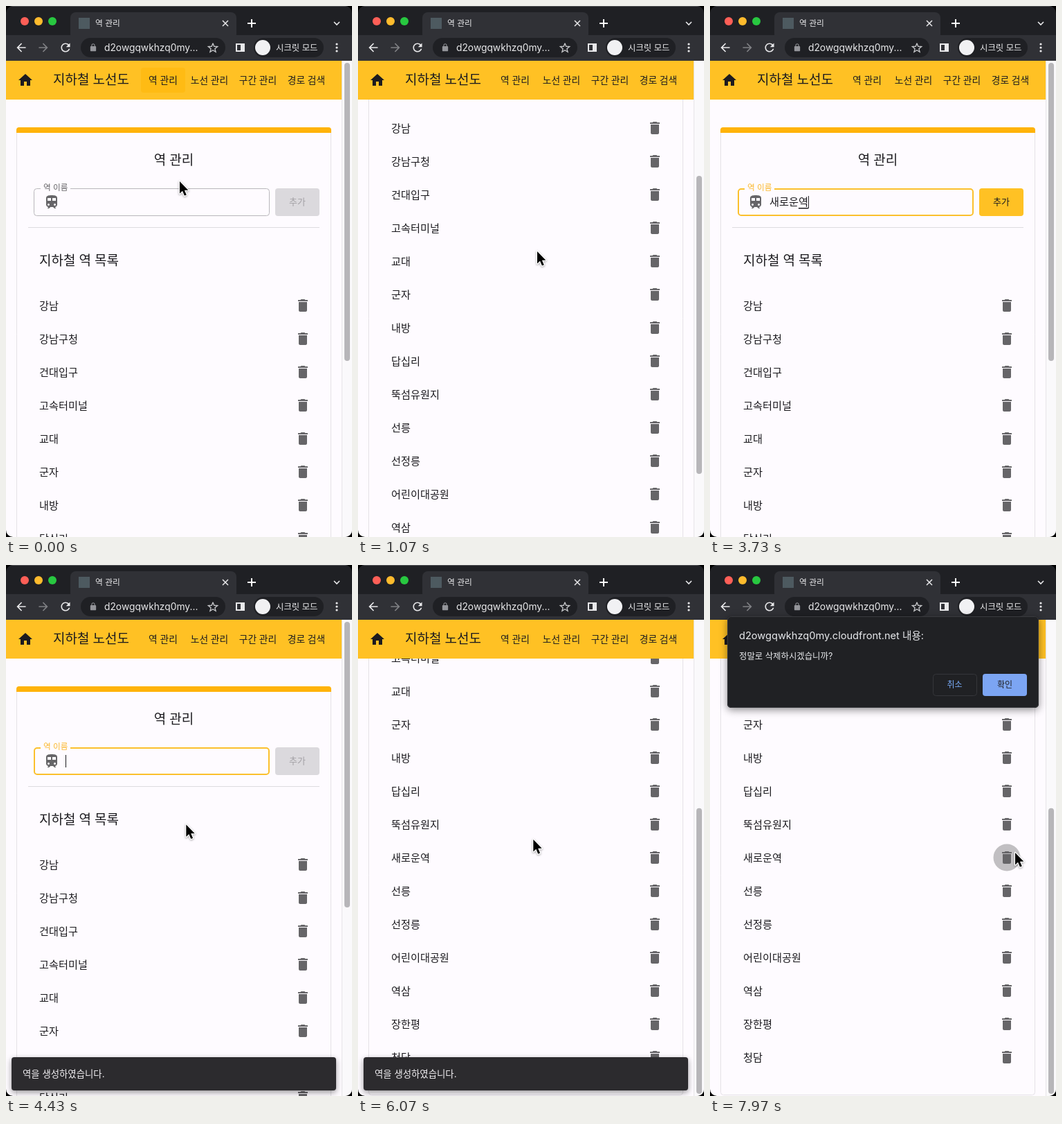
Recreate the animation shown at these times as an HTML page with a canvas. Size 500 px wide and 766 px high, loop 8 s.

```html
<!DOCTYPE html>
<html lang="ko">
<head>
<meta charset="utf-8">
<title>지하철 노선도</title>
<style>
  html, body { margin: 0; width: 100%; height: 100%; overflow: hidden; background: #000; }
  canvas { display: block; width: 500px; height: 766px; }
</style>
</head>
<body>
<canvas id="stage"></canvas>
<script>
const W = 500, H = 766, LOOP = 8000;
const canvas = document.getElementById('stage');
const ctx = canvas.getContext('2d');
const dpr = window.devicePixelRatio || 1;
canvas.width = W * dpr;
canvas.height = H * dpr;

const INK = '#1c1b1f', AMBER = '#ffc124', PAGE = '#fefbff', GRAY = '#666568';
const STATIONS = ['강남', '강남구청', '건대입구', '고속터미널', '교대', '군자', '내방', '답십리', '뚝섬유원지',
  '선릉', '선정릉', '어린이대공원', '역삼', '장한평', '청담'];
const NEW_STATION = '새로운역', NEW_INDEX = 9;
const TYPED = ['ㅅ', '새', '샐', '새로', '새롱', '새로우', '새로운', '새로운ㅇ', '새로운여', NEW_STATION];

// Moments of the interaction, in ms
const FOCUS = 2000, ENABLE = 2200, TYPE = 2340, KEY = 130, SUBMIT = 4080, SNACK_OUT = 7100;
const CLICK = 7700, DIALOG = 7830;

// 24 x 24 icons
const ICONS = {
  trash: 'M6 19c0 1.1.9 2 2 2h8c1.1 0 2-.9 2-2V7H6v12zM19 4h-3.5l-1-1h-5l-1 1H5v2h14V4z',
  home: 'M10 20v-6h4v6h5v-8h3L12 3 2 12h3v8z',
  train: 'M12 2c-4 0-8 .5-8 4v9.5C4 17.43 5.57 19 7.5 19L6 20.5v.5h2.23l2-2H14l2 2h2v-.5L16.5 19c1.93 0 3.5-1.57 3.5-3.5V6c0-3.5-3.58-4-8-4zM7.5 17c-.83 0-1.5-.67-1.5-1.5S6.67 14 7.5 14s1.5.67 1.5 1.5S8.33 17 7.5 17zm3.5-7H6V6h5v4zm2 0V6h5v4h-5zm3.5 7c-.83 0-1.5-.67-1.5-1.5s.67-1.5 1.5-1.5 1.5.67 1.5 1.5-.67 1.5-1.5 1.5z',
  back: 'M20 11H7.83l5.59-5.59L12 4l-8 8 8 8 1.41-1.41L7.83 13H20v-2z',
  reload: 'M17.65 6.35C16.2 4.9 14.21 4 12 4c-4.42 0-7.99 3.58-7.99 8s3.57 8 7.99 8c3.73 0 6.84-2.55 7.73-6h-2.08c-.82 2.33-3.04 4-5.65 4-3.31 0-6-2.69-6-6s2.69-6 6-6c1.66 0 3.14.69 4.22 1.78L13 11h7V4l-2.35 2.35z',
  lock: 'M18 8h-1V6c0-2.76-2.24-5-5-5S7 3.24 7 6v2H6c-1.1 0-2 .9-2 2v10c0 1.1.9 2 2 2h12c1.1 0 2-.9 2-2V10c0-1.1-.9-2-2-2zM9 6c0-1.66 1.34-3 3-3s3 1.34 3 3v2H9V6z'
};
for (const name in ICONS) ICONS[name] = new Path2D(ICONS[name]);
const ARROW = new Path2D('M0 0V17.5L4 13.8 6.9 20.6 9.8 19.4 6.9 12.8H12.4Z');

// Keyframes: [time, value, value, ...]
const SCROLL = [[0, 0], [350, 0], [850, 256], [1120, 256], [1620, 0], [4450, 0], [5150, 135], [5300, 135], [5800, 442]];
const POINTER = [[0, 251, 253], [350, 259, 354], [1620, 259, 354], [1950, 240, 285], [4250, 240, 285], [4500, 265, 395],
  [5900, 265, 395], [6600, 187, 402], [7130, 187, 402], [7500, 434, 428], [7650, 441, 415]];

const clamp = v => Math.max(0, Math.min(1, v));
const mix = (a, b, k) => a + (b - a) * k;
const smooth = k => k * k * (3 - 2 * k);
const ramp = (t, start, length) => smooth(clamp((t - start) / length));
const blend = (a, b, k) => `rgb(${a.map((v, i) => Math.round(mix(v, b[i], k)))})`;

function track(keys, t) {
  let i = 0;
  while (i < keys.length - 1 && keys[i + 1][0] <= t) i++;
  const a = keys[i], b = keys[Math.min(i + 1, keys.length - 1)];
  const k = a === b ? 0 : smooth((t - a[0]) / (b[0] - a[0]));
  return a.slice(1).map((v, n) => mix(v, b[n + 1], k));
}

function box(x, y, w, h, r, fill) {
  ctx.beginPath();
  ctx.roundRect(x, y, w, h, r);
  ctx.fillStyle = fill;
  ctx.fill();
}

function frame(x, y, w, h, r, color, width) {
  ctx.beginPath();
  ctx.roundRect(x + width / 2, y + width / 2, w - width, h - width, r);
  ctx.strokeStyle = color;
  ctx.lineWidth = width;
  ctx.stroke();
}

function disc(x, y, r, fill) {
  ctx.beginPath();
  ctx.arc(x, y, r, 0, Math.PI * 2);
  ctx.fillStyle = fill;
  ctx.fill();
}

function lines(color, width, ...paths) {
  ctx.beginPath();
  for (const p of paths)
    for (let i = 0; i < p.length; i += 2) i ? ctx.lineTo(p[i], p[i + 1]) : ctx.moveTo(p[0], p[1]);
  ctx.strokeStyle = color;
  ctx.lineWidth = width;
  ctx.stroke();
}

// Text is placed by its vertical centre
function text(s, x, y, size, color = INK, weight = 400, align = 'left') {
  ctx.font = `${weight} ${size}px Inter, "Noto Sans CJK KR", "Noto Sans CJK", sans-serif`;
  ctx.textAlign = align;
  ctx.fillStyle = color;
  ctx.fillText(s, x, y + size * 0.37);
}

function icon(name, x, y, color, sx = 1, sy = Math.abs(sx)) {
  ctx.save();
  ctx.translate(x, y);
  ctx.scale(sx, sy);
  ctx.translate(-12, -12);
  ctx.fillStyle = color;
  ctx.fill(ICONS[name]);
  ctx.restore();
}

function shadow(color, blur, dy) {
  ctx.shadowColor = color;
  ctx.shadowBlur = blur * dpr;
  ctx.shadowOffsetY = dy * dpr;
}

function drawBrowser() {
  const dark = '#1f2024', bar = '#303136', light = '#e8e8ea';
  box(0, 0, W, 79, 0, dark);
  box(93, 9, 240, 40, 8, bar);
  box(0, 42, W, 37, 0, bar);
  ['#fe5f57', '#febb2d', '#28c840'].forEach((c, i) => disc(27 + i * 20, 22, 6, c));
  box(105, 17, 16, 16, 0, '#4d5a60');
  text('역 관리', 129, 25, 11.8, light);
  lines(light, 1.5, [313, 21, 321, 29], [321, 21, 313, 29]);
  lines('#fff', 2, [349, 25, 361, 25], [355, 19, 355, 31]);
  lines(light, 1.6, [474, 23, 478, 27, 482, 23]);

  icon('back', 22, 60, light, 0.82);
  icon('back', 54, 60, '#7f8084', -0.82);
  icon('reload', 86, 60, light, 0.82);
  box(108, 46, 209, 28, 14, dark);
  icon('lock', 126, 60, '#94959a', 0.52);
  text('d2owgqwkhzq0my...', 142, 60, 13.8, light);
  const star = [];
  for (let i = 0; i <= 10; i++) {
    const a = -Math.PI / 2 + i * Math.PI / 5, r = i % 2 ? 3 : 7;
    star.push(299 + r * Math.cos(a), 60.7 + r * Math.sin(a));
  }
  lines('#c6c7ca', 1.3, star);
  frame(332, 54, 13, 12, 0, light, 2);
  box(339, 54, 6, 12, 0, light);
  box(358, 46, 101, 28, 14, dark);
  disc(371, 60, 11, '#f1f1f3');
  text('시크릿 모드', 390, 60, 12.4, light);
  [55, 60, 65].forEach(y => disc(478, y, 1.6, light));
}

function drawHeader(t) {
  box(0, 79, 485, 56, 0, AMBER);
  const hover = 1 - ramp(t, 60, 250);
  if (hover > 0) box(195, 89, 64, 36, 4, `rgba(255,179,0,${0.45 * hover})`);
  icon('home', 28, 107, INK);
  text('지하철 노선도', 68, 106, 19, INK, 500);
  text('역 관리', 227, 107, 13.8, INK, 500, 'center');
  ['노선 관리', '구간 관리', '경로 검색'].forEach((s, i) => text(s, 294 + i * 70, 107, 13.8, INK, 500, 'center'));
}

function drawForm(t) {
  const focused = t >= FOCUS;
  const accent = focused ? '#fbc02d' : '#b9b7bb';
  text('역 관리', 242.5, 222, 19, INK, 500, 'center');
  frame(40, 263, 341, 40, 4, accent, focused ? 2 : 1);
  box(50, 261, 43, 5, 0, PAGE);
  text('역 이름', 54, 262, 11.7, focused ? '#fbb82d' : GRAY);
  icon('train', 66, 283, GRAY);

  const enabled = ramp(t, ENABLE, 250) * (1 - ramp(t, SUBMIT, 250));
  box(389, 263, 64, 40, 4, blend([219, 217, 221], [255, 193, 36], enabled));
  text('추가', 421, 282, 13, blend([164, 162, 166], [28, 27, 31], enabled), 500, 'center');

  const typing = t >= TYPE && t < SUBMIT;
  const step = Math.min(TYPED.length - 1, Math.floor((t - TYPE) / KEY));
  const value = typing ? TYPED[step] : '';
  text(value, 86, 282.5, 15.2);
  const end = 86 + (value ? ctx.measureText(value).width : 0);
  if (value) box(end - 14, 291, 14, 1.6, 0, INK);
  const edited = t >= SUBMIT ? SUBMIT : typing ? TYPE + step * KEY : FOCUS;
  if (focused && (t - edited) % 1000 < 500) box(end, 274, 1, 18, 0, INK);
}

function drawPage(t, scroll) {
  const added = t >= SUBMIT;
  const names = STATIONS.slice();
  if (added) names.splice(NEW_INDEX, 0, NEW_STATION);

  box(0, 79, W, H - 79, 0, PAGE);
  ctx.save();
  ctx.beginPath();
  ctx.rect(0, 135, 485, H - 135);
  ctx.clip();
  ctx.translate(0, -scroll);
  frame(15, 175, 455, 312 + names.length * 48 + 720 - 720 - 48 + 0, 4, '#e4e1e6', 1);
  box(15, 175, 455, 8, [4, 4, 0, 0], '#ffb30a');
  drawForm(t);
  box(32, 319, 421, 1, 0, '#dddbdf');
  text('지하철 역 목록', 48, 367, 19, INK, 500);
  names.forEach((name, i) => {
    const y = 432 + i * 48;
    if (added && i === NEW_INDEX) {
      const hover = ramp(t, 7480, 150), ripple = ramp(t, CLICK, 200);
      if (hover) disc(429, y, 19.5, `rgba(0,0,0,${0.05 * hover})`);
      if (ripple) disc(429, y, 19.5 * mix(0.3, 1, ripple), 'rgba(0,0,0,.2)');
    }
    text(name, 48, y, 15.2);
    icon('trash', 429, y, GRAY);
  });
  ctx.restore();
  drawHeader(t);

  box(485, 79, 15, H - 79, 0, '#faf9fb');
  box(485, 79, 1, H - 79, 0, '#e7e5e8');
  const ratio = added ? 0.608 : 0.637;
  box(489, 82 + scroll * ratio, 8, added ? 412 : 430, 4, '#b7b6b9');
}

function drawSnackbar(t) {
  const shown = ramp(t, SUBMIT, 120) * (1 - ramp(t, SNACK_OUT, 195));
  if (!shown) return;
  ctx.save();
  ctx.globalAlpha = shown;
  ctx.translate(242.5, 734);
  ctx.scale(mix(0.75, 1, shown), mix(0.56, 1, shown));
  ctx.translate(-242.5, -734);
  shadow('rgba(0,0,0,.4)', 8, 3);
  box(8, 710, 469, 48, 4, '#2c2b2e');
  shadow('transparent', 0, 0);
  text('역을 생성하였습니다.', 24, 734, 13.4, '#f4f2f5');
  ctx.restore();
}

function drawDialog() {
  ctx.save();
  shadow('rgba(0,0,0,.45)', 12, 3);
  box(25, 74, 450, 132, 5, '#202124');
  ctx.restore();
  frame(25, 74, 450, 132, 5, '#3a3b3f', 1);
  text('d2owgqwkhzq0my.cloudfront.net 내용:', 42, 102, 14.6, '#e8eaed');
  text('정말로 삭제하시겠습니까?', 42, 131, 12.4, '#e8eaed');
  frame(322, 157, 64, 32, 4, '#35363a', 1);
  text('취소', 353.5, 173, 12, '#78aaf5', 500, 'center');
  box(394, 157, 64, 32, 4, '#7ca5f3');
  text('확인', 426, 173, 12, '#202124', 500, 'center');
}

function drawPointer(t) {
  const [x, y] = track(POINTER, t);
  const ring = ramp(t, 6750, 120) * (1 - ramp(t, 7050, 80));
  if (ring) {
    ctx.save();
    ctx.globalAlpha = ring;
    ctx.beginPath();
    ctx.arc(x - 1.5, y + 1, 30, 0, Math.PI * 2);
    ctx.strokeStyle = '#000';
    ctx.lineWidth = 1.5;
    ctx.stroke();
    ctx.restore();
  }
  if (t > ENABLE && t < 4250) return; // hidden while typing
  ctx.save();
  ctx.translate(x, y);
  if (t > 1850 && t <= ENABLE) {
    lines('#222', 1.2, [-3, -8, 0, -6, 0, 7, -3, 9], [3, -8, 0, -6], [0, 7, 3, 9]);
  } else {
    ctx.lineJoin = 'round';
    ctx.strokeStyle = '#fff';
    ctx.lineWidth = 2.6;
    shadow('rgba(0,0,0,.35)', 3, 1);
    ctx.stroke(ARROW);
    shadow('transparent', 0, 0);
    ctx.fillStyle = '#000';
    ctx.fill(ARROW);
  }
  ctx.restore();
}

function render(now) {
  const t = now % LOOP;
  ctx.setTransform(dpr, 0, 0, dpr, 0, 0);
  box(0, 0, W, H, 0, '#000');
  ctx.save();
  ctx.beginPath();
  ctx.roundRect(0, 0, W, H, 10);
  ctx.clip();
  drawPage(t, track(SCROLL, t)[0]);
  drawSnackbar(t);
  drawBrowser();
  if (t >= DIALOG) drawDialog();
  box(0, 0, W, 1, 0, '#55565a');
  ctx.restore();
  drawPointer(t);
  requestAnimationFrame(render);
}
requestAnimationFrame(render);
</script>
</body>
</html>
```
